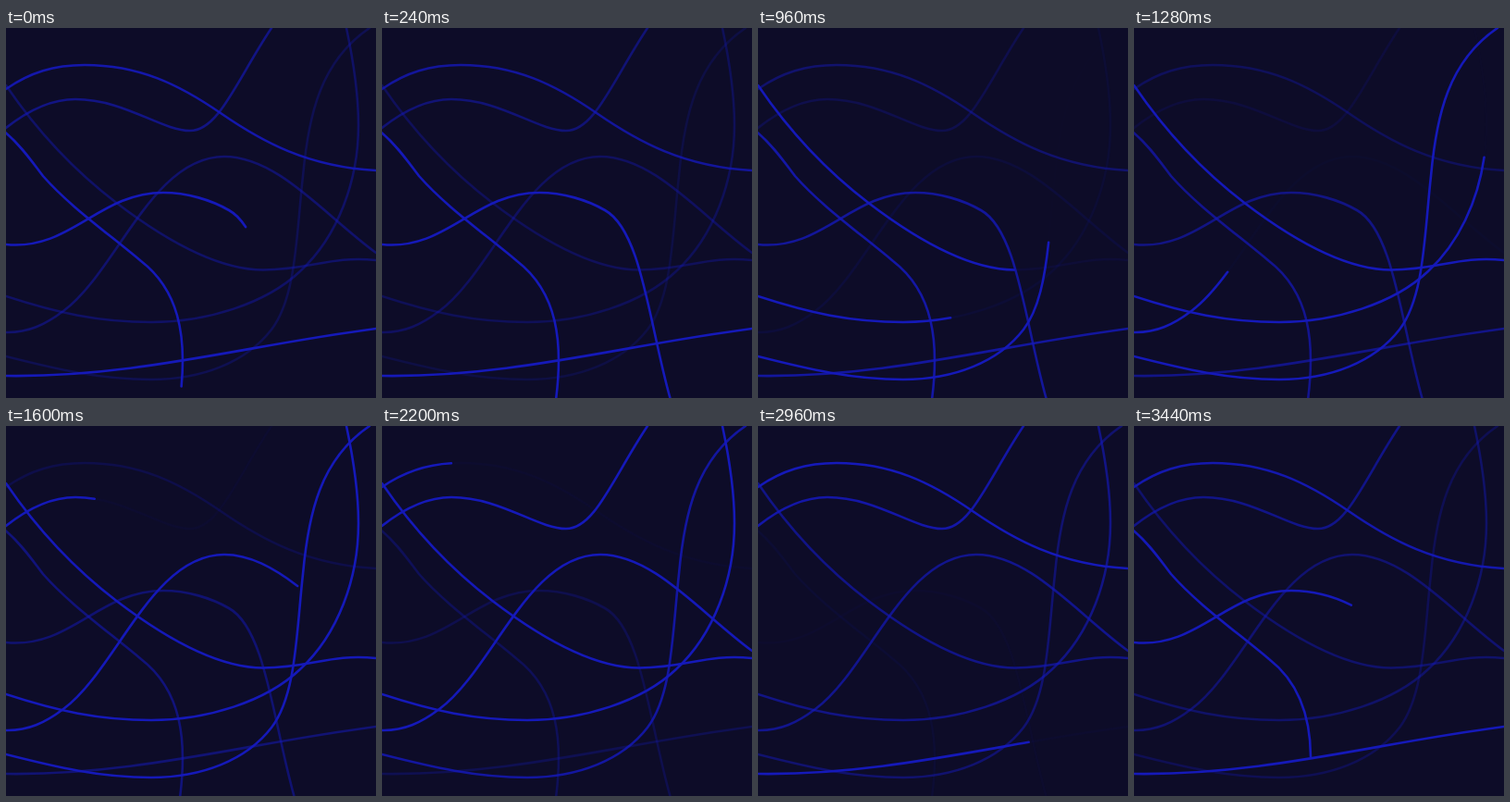
Recreate the animation shown at these times as an HTML page with a canvas. Size 400 px wide and 400 px high, loop 3480 ms.

```html
<!DOCTYPE html>
<html lang="en">
<head>
<meta charset="utf-8">
<title>Flowing lines</title>
<style>
  html, body { margin: 0; width: 100%; height: 100%; overflow: hidden; background: #0d0c28; }
  canvas { display: block; width: 100vw; height: 100vh; }
</style>
</head>
<body>
<canvas id="stage" width="400" height="400"></canvas>
<script>
const ctx = document.getElementById('stage').getContext('2d');
const LOOP = 3480;
const FRAME = 40;
const FADE = 2650;
const lines = [];

// start: ms in the loop, speed: px per ms, hold: age in ms when fading begins
function addLine(start, speed, hold, d) {
  lines.push({ start, speed, hold, path: new Path2D(d) });
}

addLine(2090, 0.73, 1200, 'M0 66C26 48 52 40 85 40C144 40 187 61 232 92S326 150 400 154');
addLine(1462, 0.75, 1250, 'M0 108C24 89 48 77 75 77C128 77 168 111 199 111S249 57 287 0');
addLine(492, 0.75, 1750, 'M0 62C34 112 72 153 120 189.5S226 261.5 278 261.5S350 246 400 251');
addLine(702, 0.82, 1500, 'M0 290C55 308 100 318 157 318C217 318 281 298 318 263C359 225 381 165 381 105C381 70 375 33 368 0');
addLine(490, 0.86, 1350, 'M0 355C55 369 102 380 157 380S260 361 287 326S314 222 321 160C327 94 340 36 393 0');
addLine(1136, 0.87, 1200, 'M0 329C24 329.5 42 321 62 306C120 263 158 139 236 139C294 139 345 203 400 243');
addLine(3012, 0.75, 1150, 'M0 113.5C16 127 27 143 40 160C68 192 109 221 146 252C190 286 196 340 188 402');
addLine(3138, 0.825, 850, 'M0 234C70 241 100 178 170 178C196 178 222 186 241 197C281 219 289 322 312 402');
addLine(2600, 0.82, 1450, 'M0 376C140 378 260 343 400 325');

function opacity(line, age) {
  const u = Math.min(1, Math.max(0, (age - line.hold) / FADE));
  return Math.pow(1 - u, 1.3);
}

function strokeLine(line, age) {
  const alpha = opacity(line, age);
  const length = age * line.speed;
  if (alpha <= 0 || length <= 0) return;
  ctx.globalAlpha = alpha;
  ctx.setLineDash([length, 9999]);
  ctx.stroke(line.path);
}

function draw(time) {
  ctx.globalAlpha = 1;
  ctx.fillStyle = '#0d0c28';
  ctx.fillRect(0, 0, 400, 400);
  ctx.strokeStyle = '#1519b9';
  ctx.lineWidth = 2.6;
  ctx.lineCap = 'round';
  for (const line of lines) {
    const age = (time - line.start + LOOP) % LOOP;
    strokeLine(line, age + LOOP); // fading remains of the previous pass
    strokeLine(line, age);
  }
}

const begin = performance.now();

function tick() {
  const time = (performance.now() - begin) % LOOP;
  draw(Math.floor(time / FRAME) * FRAME);
  requestAnimationFrame(tick);
}

draw(0);
requestAnimationFrame(tick);
</script>
</body>
</html>
```
